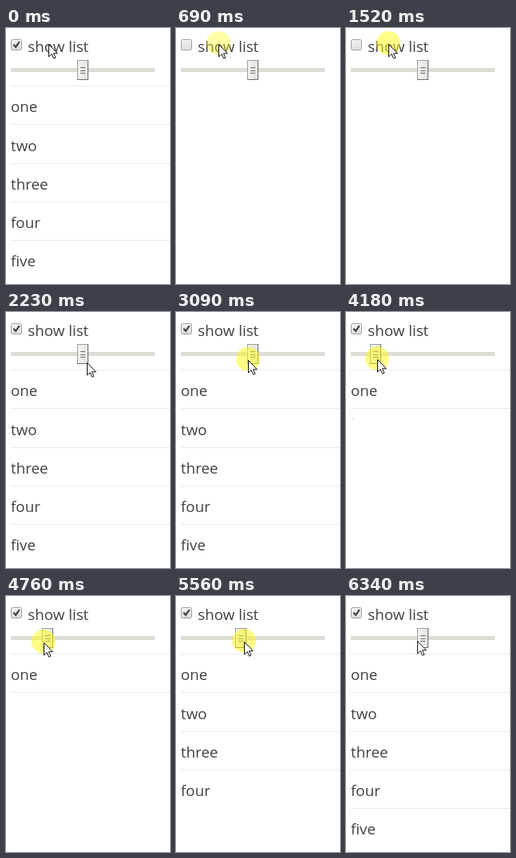
These frames come from a looping animation (205 px wide and 320 px high, 6.9 s). An HTML page:

```html
<!DOCTYPE html>
<html lang="en">
<head>
<meta charset="utf-8">
<title>Sliding list</title>
<style>
  html, body { margin: 0; width: 100%; height: 100%; overflow: hidden; background: #fff; }
  svg { display: block; width: 205px; height: 320px; }
  text { font: 18.8px "Open Sans", "Noto Sans", sans-serif; fill: #414141; }
</style>
</head>
<body>
<svg viewBox="0 0 205 320">
  <defs id="defs">
    <linearGradient id="boxFill" x1="0" y1="0" x2="0" y2="1">
      <stop offset="0" stop-color="#f3f3f3"/><stop offset="1" stop-color="#dcdcdc"/>
    </linearGradient>
    <linearGradient id="thumbFill" x1="0" y1="0" x2="1" y2="0">
      <stop offset="0" stop-color="#f5f4f1"/><stop offset="1" stop-color="#e4e2dd"/>
    </linearGradient>
  </defs>
  <rect width="205" height="320" fill="#fff"/>
  <rect x="6.5" y="14.5" width="13" height="13" rx="2" fill="url(#boxFill)" stroke="#a0a0a0"/>
  <path id="check" d="M9.4 20.8l2.8 3 4.6-6.6" fill="none" stroke="#404040" stroke-width="2.2"/>
  <text x="27.2" y="30">show list</text>
  <rect x="6" y="50" width="180" height="5" fill="#dfdcd8"/>
  <g id="thumb">
    <rect x=".5" y=".5" width="13" height="24" fill="url(#thumbFill)" stroke="#9b9b9b"/>
    <path d="M13.5 0v24.5H0" fill="none" stroke="#6d6d6d"/>
    <path d="M4 9.5h6M4 13.5h6M4 16.5h6" stroke="#6a6a66"/>
  </g>
  <g id="list"></g>
  <circle id="halo" r="15" fill="#fffb10"/>
  <path id="cursor" d="M.5 .5V16l3.6-3.4 2.5 5.6 2.3-1-2.5-5.4h5Z" fill="#fff" stroke="#111" stroke-linejoin="round"/>
</svg>
<script>
const LOOP = 6900, STEP = 65, SLIDE = 400, FADE = 260;
const TOP = 72, ROW = 48.25, PAD = 10, NOTCH = 14.7;
const words = ["one", "two", "three", "four", "five"];

// Mouse button: hide the list, show it again, drag the slider.
const presses = [[440, 620], [1520, 1640], [2500, 5950]];
const [hide, show, drag] = presses;

// Pointer path: time, x, y.
const path = [
  [0, 53, 19], [1640, 53, 19], [2230, 101, 62], [2500, 97, 59], [2950, 97, 59],
  [3660, 59.5, 58], [4250, 36, 58], [4640, 36, 58], [4760, 47, 57],
  [5200, 77, 56], [5560, 85, 56], [5800, 89.3, 55], [LOOP, 89.3, 55]
];
const beats = [...path.map(p => p[0]), ...presses.flat()].sort((a, b) => a - b);

const $ = id => document.getElementById(id);
const clamp = v => Math.max(0, Math.min(1, v));
const cubicOut = v => 1 - (1 - clamp(v)) ** 3;
const within = (t, [from, to]) => t >= from && t < to;

function set(el, attrs) {
  for (const k in attrs) el.setAttribute(k, attrs[k]);
  return el;
}

function make(tag, attrs, parent) {
  const el = document.createElementNS("http://www.w3.org/2000/svg", tag);
  return parent.appendChild(set(el, attrs));
}

const rows = words.map((word, i) => {
  const clip = make("clipPath", { id: "clip" + i }, $("defs"));
  const mask = make("rect", { x: 0, width: 205 }, clip);
  const g = make("g", {}, $("list"));
  const line = make("rect", { x: 6, width: 199, height: 1, fill: "#ebebeb" }, g);
  const holder = make("g", { "clip-path": `url(#clip${i})` }, g);
  const label = make("text", { x: 6 }, holder);
  label.textContent = word;
  return { mask, g, line, label, turns: [] };
});

function pointer(t) {
  const i = path.findIndex(p => p[0] > t);
  const [a, b] = [path[i - 1], path[i]];
  const k = (t - a[0]) / (b[0] - a[0]);
  return [a[1] + (b[1] - a[1]) * k, a[2] + (b[2] - a[2]) * k];
}

// The thumb snaps to the notch nearest the pointer.
const sliderAt = t => within(t, drag) ? 5 + Math.round((pointer(t)[0] - 96) / NOTCH) : 5;

// Note when each row is dropped or added during the drag.
for (let t = drag[0], last = 5; t < drag[1]; t += 5) {
  const now = sliderAt(t);
  if (now !== last) rows[Math.min(now, last)].turns.push({ t, to: now > last ? 1 : 0 });
  last = now;
}

const rowSize = (row, t) => row.turns.reduce(
  (size, turn) => size + (turn.to - size) * cubicOut((t - turn.t) / SLIDE), 1);

function haloAlpha(t) {
  const last = presses.filter(p => p[0] <= t).pop();
  return last ? 0.5 * (1 - clamp((t - last[1]) / FADE)) : 0;
}

function drawRows(t) {
  let top = TOP;
  for (const row of rows) {
    const size = rowSize(row, t);
    const height = size > 0.001 ? 1 + (ROW - 1) * size : 0;
    const y = Math.round(top);
    set(row.g, { opacity: Math.min(size * 20, 1) });
    set(row.line, { y });
    set(row.mask, { y, height });
    set(row.label, { y: Math.round(top + 23.3 + PAD * size) });
    top += height;
  }
}

function draw(time) {
  const beat = beats.filter(b => b <= time).pop();
  const t = beat + Math.floor((time - beat) / STEP) * STEP;
  const display = within(t, [hide[1], show[1]]) ? "none" : "";
  const [x, y] = pointer(t);

  $("check").style.display = $("list").style.display = display;
  drawRows(t);
  set($("thumb"), { transform: `translate(${Math.round(89 + (sliderAt(t) - 5) * NOTCH)} 40)` });
  set($("halo"), { cx: x, cy: y, opacity: haloAlpha(t) });
  set($("cursor"), { transform: `translate(${Math.round(x)} ${Math.round(y + 1)})` });
}

const origin = performance.now();
function tick() {
  draw((performance.now() - origin) % LOOP);
  requestAnimationFrame(tick);
}
tick();
</script>
</body>
</html>
```
